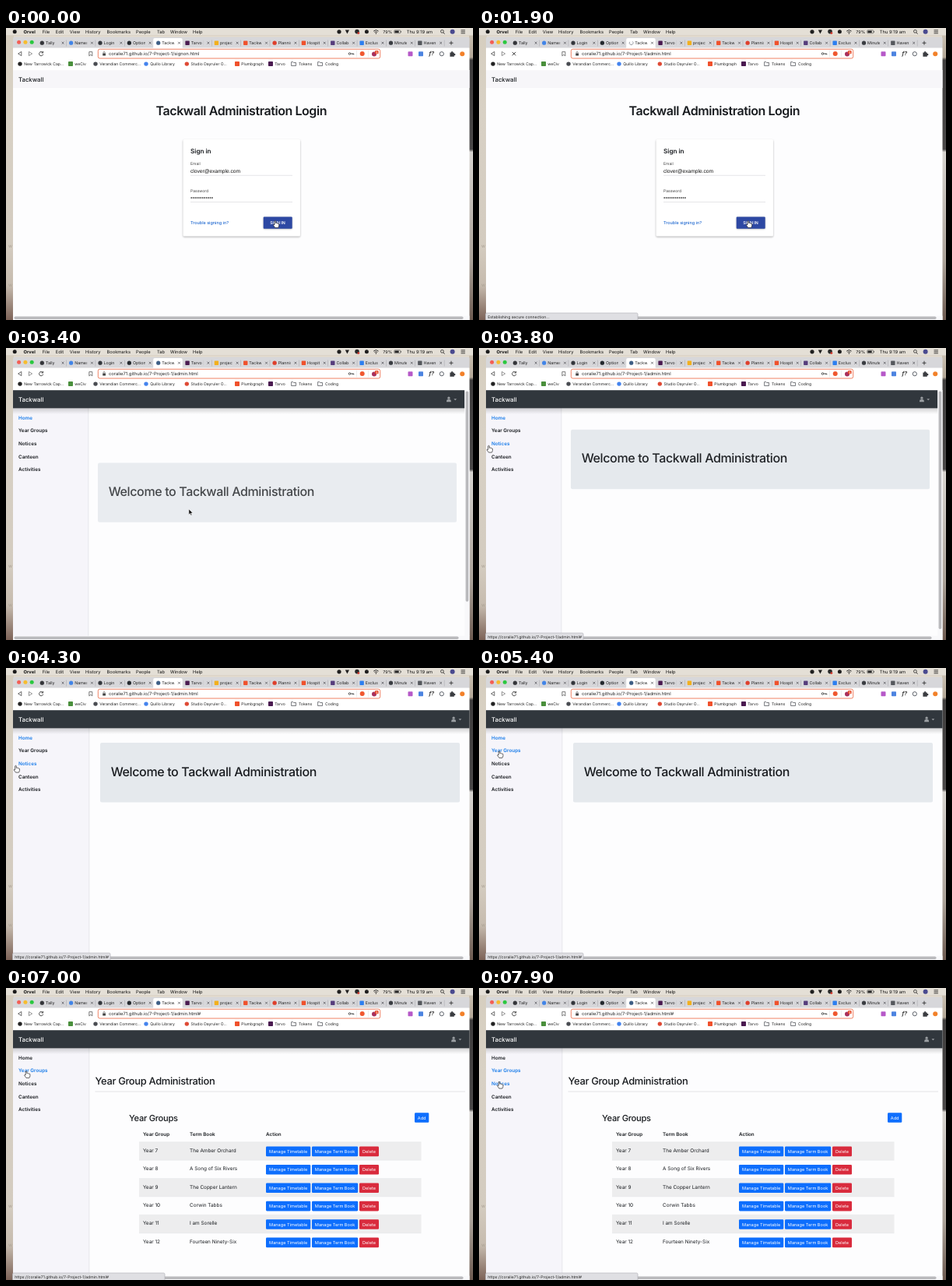
Animation, 600 px wide and 375 px high, one loop 8 s. Source, as an HTML page:

```html
<!DOCTYPE html>
<html lang="en">
<head>
<meta charset="utf-8">
<title>Administration login</title>
<style>
  html, body { margin: 0; width: 100%; height: 100%; overflow: hidden; background: #e3dacb; }
  svg { display: block; width: 100%; height: 100%; }
  text { font-family: Inter, Roboto, sans-serif; white-space: pre; text-rendering: geometricPrecision; }
</style>
</head>
<body>
<svg id="stage" viewBox="0 0 600 375">
  <defs>
    <linearGradient id="deskLeft" x2="0" y2="1">
      <stop offset="0" stop-color="#d6cebf"/><stop offset=".3" stop-color="#d8d1c5"/>
      <stop offset=".75" stop-color="#d3cbbf"/><stop offset=".88" stop-color="#c6bbae"/>
      <stop offset="1" stop-color="#7d6358"/>
    </linearGradient>
    <linearGradient id="deskRight" x2="0" y2="1">
      <stop offset="0" stop-color="#cfc6b8"/><stop offset=".1" stop-color="#b3a797"/>
      <stop offset=".11" stop-color="#3f3d3d"/><stop offset=".415" stop-color="#4a4848"/>
      <stop offset=".425" stop-color="#d6d3cf"/><stop offset=".8" stop-color="#aaa198"/>
      <stop offset="1" stop-color="#6d5a50"/>
    </linearGradient>
    <linearGradient id="drop" x2="0" y2="1">
      <stop offset="0" stop-opacity=".17"/><stop offset="1" stop-opacity="0"/>
    </linearGradient>
    <clipPath id="tabClip"><rect x="4" y="12" width="16.5" height="14"/></clipPath>
    <filter id="soft" x="-10%" y="-10%" width="120%" height="125%"><feGaussianBlur stdDeviation="1"/></filter>
  </defs>
</svg>
<script>
const LOOP = 8000;
const LOAD = 1000, ADMIN = 2650, SLIDE = 1500, GROUPS = 6200;
const INK = '#181b1f', BLUE = '#0d6efd', LINK = '#177bea', RED = '#d92b3d';
const HOST = 'coralie71.github.io/7-Project-1/';
const stage = document.getElementById('stage');

function el(tag, attrs, parent = stage) {
  const node = document.createElementNS('http://www.w3.org/2000/svg', tag);
  for (const key in attrs) node.setAttribute(key, attrs[key]);
  return parent.appendChild(node);
}
const group = (parent, attrs) => el('g', attrs, parent);
const rect = (p, x, y, width, height, fill, more) => el('rect', { x, y, width, height, fill, ...more }, p);
const dot = (p, cx, cy, r, fill, more) => el('circle', { cx, cy, r, fill, ...more }, p);
const line = (p, d, stroke, width = 0.7, more) =>
  el('path', { d, stroke, 'stroke-width': width, fill: 'none', ...more }, p);
function text(p, x, y, str, size, fill = INK, more) {
  const node = el('text', { x, y, 'font-size': size, fill, ...more }, p);
  node.textContent = str;
  return node;
}
const MEDIUM = { 'font-weight': 500 };
const BOLD = { 'font-weight': 600 };
const heading = (spacing, weight = 500) => ({ 'font-weight': weight, 'letter-spacing': spacing });
const show = (node, on) => node.setAttribute('visibility', on ? 'inherit' : 'hidden');
const put = (node, attrs) => { for (const key in attrs) node.setAttribute(key, attrs[key]); };

// Desktop
rect(stage, 0, 0, 10, 375, 'url(#deskLeft)');
rect(stage, 595, 0, 5, 375, 'url(#deskRight)');
for (const y of [282, 332]) text(stage, 3, y, 'w', 6, '#a99f92');
rect(stage, 9, 54, 586.5, 321, '#fdfdfe');

// Login page
const login = group();
rect(login, 9, 54, 586.5, 23, '#f7f6f9');
text(login, 16, 68.8, 'Tackwall', 7.75, INK, MEDIUM);
text(login, 302.3, 112.2, 'Tackwall Administration Login', 16, INK,
  { ...heading(-0.43, 600), 'text-anchor': 'middle' });
rect(login, 227.5, 143.9, 150.5, 124.5, '#000', { opacity: 0.3, rx: 1.5, filter: 'url(#soft)' });
rect(login, 227.5, 143, 150.5, 124.5, '#fff', { rx: 1.5 });
text(login, 237, 161, 'Sign in', 8.1, INK, BOLD);
text(login, 237, 176.2, 'Email', 5, '#444');
text(login, 237, 185.8, 'clover@example.com', 6.67, '#111',
  { style: 'font-family: "Liberation Sans", Arial, sans-serif' });
text(login, 237, 210.7, 'Password', 5, '#444');
for (let i = 0; i < 12; i++) dot(login, 238.2 + i * 2.43, 218, 0.85, '#111');
for (const y of [189.3, 223.5]) line(login, `M237 ${y}H368`, '#d4d4d8', 0.6);
text(login, 237, 252, 'Trouble signing in?', 5.45, '#1c66cf', MEDIUM);
rect(login, 330.8, 243.2, 36.8, 15, '#000', { opacity: 0.3, rx: 1.2, filter: 'url(#soft)' });
rect(login, 330.7, 242.6, 37, 15.2, '#2d48a3', { rx: 1 });
text(login, 349, 252.1, 'SIGN IN', 5.3, '#fff', { ...BOLD, 'text-anchor': 'middle' });

// Administration page
const admin = group();
const sidebar = rect(admin, 9, 77, 98, 298, '#f6f5fa');
const sideEdge = rect(admin, 106.6, 77, 0.6, 298, '#dcdce1');
const items = ['Home', 'Year Groups', 'Notices', 'Canteen', 'Activities'].map((name, i) =>
  text(admin, 16, 91.7 + i * 16.65, name, 6.3, INK, BOLD));

const welcome = group(admin);
const panel = rect(welcome, 0, 0, 462, 76.4, '#e5e9ed', { rx: 2 });
text(welcome, 13.7, 42.6, 'Welcome to Tackwall Administration', 16, INK, heading(-0.37));

const groups = group(admin);
text(groups, 114.5, 123.8, 'Year Group Administration', 12.9, INK, heading(-0.33));
line(groups, 'M114.5 133H590', '#d2d2d5', 0.6);
text(groups, 158, 171.2, 'Year Groups', 11.1, INK, heading(-0.25));

function button(x, y, width, label, fill) {
  rect(groups, x, y, width, 12.6, fill, { rx: 1.3 });
  text(groups, x + width / 2, y + 8.4, label, 5.6, '#fff', { 'text-anchor': 'middle' });
}
button(525, 160.2, 18.3, 'Add', BLUE);
[[176, 'Year Group'], [236, 'Term Book'], [334, 'Action']].forEach(([x, label]) =>
  text(groups, x, 189.8, label, 6.3, INK, BOLD));
['The Amber Orchard', 'A Song of Six Rivers', 'The Copper Lantern', 'Corwin Tabbs',
  'I am Sorelle', 'Fourteen Ninety-Six'].forEach((book, i) => {
  const y = 197.8 + i * 23.4;
  if (i % 2 === 0) rect(groups, 171, y, 362.5, 23.4, '#ededee');
  line(groups, `M171 ${y}H533.5`, '#dfe1e4', 0.4);
  text(groups, 176, y + 13, 'Year ' + (7 + i), 6.4);
  text(groups, 236, y + 13, book, 6.4);
  button(334, y + 5.8, 57.3, 'Manage Timetable', BLUE);
  button(393, y + 5.8, 59.2, 'Manage Term Book', BLUE);
  button(454, y + 5.8, 25, 'Delete', RED);
});

const navShade = rect(admin, 9, 77, 586.5, 8, 'url(#drop)');
const navbar = rect(admin, 9, 54, 586.5, 23.3, '#31373d');
text(admin, 16, 68.8, 'Tackwall', 7.75, '#fff', MEDIUM);
const user = group(admin);
dot(user, 0, 64.2, 1.6, '#999da1');
el('path', { d: 'M-2.9 69.2v-1.2q0-2 2-2h1.8q2 0 2 2v1.2z', fill: '#999da1' }, user);
el('path', { d: 'M6.4 65.3h3.8l-1.9 1.9z', fill: '#999da1' }, user);

// Scrollbars and status bubble
rect(stage, 9, 369.6, 586.5, 5.4, '#f8f8fa');
const hThumb = rect(stage, 10.5, 370.6, 577, 3.3, '#b9b9bc', { rx: 1.6 });
const vBar = group();
rect(vBar, 589.3, 54, 6.2, 316, '#f8f8fa');
const vThumb = rect(vBar, 590.6, 55.5, 3.6, 300, '#b9b9bc', { rx: 1.8 });
const status = group();
const bubble = rect(status, 8.5, 366, 195.5, 10, '#dfdfe3', { rx: 1.5, stroke: '#aeaeb4', 'stroke-width': 0.6 });
const statusText = text(status, 11.3, 372.8, '', 5.1, '#222');

// Tab strip
rect(stage, 9, 11.5, 586.5, 15, '#d7d7da', { rx: 2 });
rect(stage, 9, 25.5, 586.5, 28.7, '#fff');
['#f45f56', '#f7bd2e', '#2bc840'].forEach((c, i) => dot(stage, 16.6 + i * 8.3, 18.2, 2.5, c));
let spinner, tabIcon;
[['Tally', '#35363a', 1], ['Names', '#4285e8', 1], ['Login', '#33373c', 1], ['Option', '#24292e', 1],
  ['Tackwa', '#3f5f86', 1], ['Tarvo |', '#4a1a50', 0], ['project', '#f2b01e', 0], ['Tackwa', '#f0512c', 0],
  ['Plannin', '#df3f2c', 1], ['Hospita', '#f0512c', 0], ['Collabo', '#563d7c', 0], ['Exclusi', '#2d7ff0', 0],
  ['Minute', '#3a3d42', 1], ['Haven:', '#55585d', 0]].forEach(([title, color, round], i) => {
  const tab = group(stage, { transform: `translate(${46.3 + i * 37.35} 0)` });
  const active = i === 4;
  if (active) el('path', { d: 'M-6.5 26V15q0-2 2-2H29q2 0 2 2V26z', fill: '#fff' }, tab);
  else if (i !== 3) rect(tab, 31, 15.5, 0.5, 8, '#a3a3a8');
  const icon = round ? dot(tab, 0, 19.2, 2.6, color) : rect(tab, -2.7, 16.4, 5.4, 5.6, color, { rx: 0.7 });
  if (active) {
    tabIcon = icon;
    spinner = line(tab, 'M0 16.8a2.4 2.4 0 1 1-2.4 2.4', '#8d9299', 0.8);
  }
  const label = group(tab, { 'clip-path': 'url(#tabClip)' });
  text(label, 4.6, 21.1, title, 5.3, '#222');
  line(tab, 'M25.4 17.8l2.8 2.8m0-2.8l-2.8 2.8', '#44444a', 0.7);
});
line(stage, 'M569.5 19.2h5M572 16.7v5', '#333', 0.9);

// Toolbar
const ROUND = { 'stroke-linejoin': 'round' };
line(stage, 'M19.8 30.4v5.2l-4.2-2.6z', '#444', 0.8, ROUND);
line(stage, 'M29.4 30.4v5.2l4.2-2.6z', '#777', 0.8, ROUND);
const reload = line(stage, 'M47.1 31.4a2.6 2.6 0 1 0 .6 2.2M47.6 29.9v2h-2', '#333', 0.9);
const stop = line(stage, 'M42.7 30.9l4.4 4.4m0-4.4l-4.4 4.4', '#333', 0.9);
line(stage, 'M106.8 30.6h4v5.2l-2-1.5-2 1.5z', '#444', 0.7);
rect(stage, 118.3, 27.2, 362.4, 11.8, '#fff', { rx: 2.2, stroke: '#ee7453', 'stroke-width': 0.9 });
rect(stage, 124.2, 32.5, 3.8, 3, '#444', { rx: 0.5 });
line(stage, 'M125 32.6v-1a1.1 1.1 0 0 1 2.2 0v1', '#444', 0.6);
const url = text(stage, 132, 35.2, '', 5.83, '#222');
dot(stage, 441.5, 33, 1.3, 'none', { stroke: '#333', 'stroke-width': 0.8 });
line(stage, 'M442.8 33h4v1.4m-1.5-1.4v1.1', '#333', 0.8);
rect(stage, 450.5, 28.5, 0.5, 9, '#ddd');
dot(stage, 457.7, 33, 3, '#f0572f');
rect(stage, 465.5, 28.5, 0.5, 9, '#ddd');
dot(stage, 473, 33.6, 3, '#a8305c');
rect(stage, 474, 28.9, 4.6, 4.4, '#e8502e', { rx: 1 });
text(stage, 475.2, 32.6, '1', 4, '#fff', BOLD);
rect(stage, 516.5, 30.2, 6, 6, '#b659c8', { rx: 0.8 });
rect(stage, 530, 30.2, 6, 6, '#4c83e0', { rx: 0.8 });
text(stage, 543.4, 35.4, 'f?', 7, '#222', { 'font-style': 'italic', 'font-weight': 600 });
dot(stage, 559.8, 33.2, 2.6, 'none', { stroke: '#4a5058', 'stroke-width': 0.9 });
el('path', { d: 'M570.4 31.5h1.7a1.1 1.1 0 1 1 2 0h1.7v1.6a1.1 1.1 0 1 1 0 2v1.6h-5.4z', fill: '#3a3c40' });
dot(stage, 586.2, 33.2, 3, '#f2812a');

// Bookmarks
[[18, 'New Tarrowick Cap...', '#222', 1], [83, 'weCiv', '#4a8f3c', 0], [115, 'Verandian Commerc...', '#4a4d52', 1],
  [180, 'Quillo Library', '#4584ee', 1], [232.3, 'Studio Dayruler O...', '#df4a35', 1],
  [297, 'Plumbgraph', '#f0512c', 0], [340, 'Tarvo', '#4a1a50', 0],
  [369.5, 'Tokens', null], [403.5, 'Coding', null]].forEach(([x, label, color, round]) => {
  if (!color) line(stage, `M${x - 2.9} 43.6h2.2l.8.9h2.9v4h-5.9z`, '#44474c', 0.7);
  else if (round) dot(stage, x, 46.1, 2.7, color);
  else rect(stage, x - 3, 43, 6, 6, color, { rx: 0.7 });
  text(stage, x + (color ? 5.2 : 6.5), 47.9, label, 5.05, '#222');
});

// Menu bar
rect(stage, 0, 0, 600, 9.6, '#e4dfd6');
rect(stage, 0, 9.4, 600, 0.4, '#cbc4b8');
dot(stage, 11.2, 4.8, 2.5, '#1b1b1b');
[[22.5, 'Orvel'], [46.7, 'File'], [63.8, 'Edit'], [81.8, 'View'], [102, 'History'], [129.5, 'Bookmarks'],
  [167, 'People'], [194, 'Tab'], [211, 'Window'], [240, 'Help']].forEach(([x, label], i) =>
  text(stage, x, 6.9, label, 5.75, '#111', { 'font-weight': i ? 400 : 700 }));
dot(stage, 428, 4.8, 2.6, '#1f1f1f');
el('path', { d: 'M435.8 2.6h5.2l-2.6 4.9z', fill: '#1f1f1f' });
dot(stage, 451, 4.6, 2.8, '#2a2a2a');
dot(stage, 452.9, 6.6, 1.4, '#d6382d');
dot(stage, 463.4, 4.8, 2.5, '#1f1f1f');
line(stage, 'M472.2 4.1q3.2-3 6.4 0M473.6 5.6q1.8-1.6 3.6 0', '#1f1f1f', 0.9);
dot(stage, 475.4, 7, 0.7, '#1f1f1f');
text(stage, 484.3, 6.8, '79%', 5.4, '#111');
rect(stage, 498.8, 2.8, 8, 4, 'none', { rx: 0.8, stroke: '#333', 'stroke-width': 0.5 });
rect(stage, 499.5, 3.5, 5.2, 2.6, '#222');
rect(stage, 507.2, 4, 0.7, 1.6, '#333');
text(stage, 514.8, 6.9, 'Thu 9:19 am', 5.75, '#111');
dot(stage, 560.4, 4.3, 1.9, 'none', { stroke: '#222', 'stroke-width': 0.8 });
line(stage, 'M561.8 5.8l1.8 1.8', '#222', 0.9);
dot(stage, 573.6, 4.8, 3, '#4a4a8f');
line(stage, 'M584.5 2.8h5.4m-5.4 2h5.4m-5.4 2h5.4', '#222', 0.8);

// Pointer, drawn with its tip at the group's zero point
const pointer = group();
const hand = el('path', {
  d: 'M-.8 .5q.8-1 1.6 0V3q.9-.6 1.5.2.9-.5 1.4.4 1.2-.3 1.2 1V6q0 1.6-1 2.8H-.1Q-1.2 7.2-2.4 5.6q0-1.2 1.6-.4z',
  fill: '#fff', stroke: '#111', 'stroke-width': 0.65, 'stroke-linejoin': 'round'
}, pointer);
const arrow = el('path', {
  d: 'M0 0v7l1.6-1.5 1.1 2.5 1.2-.5-1.1-2.4h2.3z', fill: '#111', stroke: '#fff', 'stroke-width': 0.5
}, pointer);

// Pointer stops: time, x, y
const path = [[0, 345.8, 247.6], [3200, 345.8, 247.6], [3720, 12.5, 125.3], [4500, 12.5, 125.3],
  [5100, 26, 106.6], [7450, 26, 106.6], [7750, 26, 120.2], [LOOP, 26, 120.2]];

function pointerAt(t) {
  const i = path.findIndex(([time]) => time > t);
  const [a, b] = [path[i - 1], path[i]];
  const k = (t - a[0]) / (b[0] - a[0]);
  const s = k * k * (3 - 2 * k);
  return [a[1] + (b[1] - a[1]) * s, a[2] + (b[2] - a[2]) * s];
}

// CSS "ease": cubic-bezier(.25, .1, .25, 1)
function ease(x) {
  let lo = 0, hi = 1;
  for (let i = 0; i < 20; i++) {
    const u = (lo + hi) / 2, v = 1 - u;
    if (0.75 * v * v * u + 0.75 * v * u * u + u * u * u < x) lo = u; else hi = u;
  }
  const u = lo, v = 1 - u;
  return 0.3 * v * v * u + 3 * v * u * u + u * u * u;
}

function draw(t) {
  const onAdmin = t >= ADMIN, onGroups = t >= GROUPS;
  const loading = t >= LOAD && !onAdmin;
  const sliding = onAdmin && t < ADMIN + SLIDE;
  const [x, y] = pointerAt(t);
  const hover = onAdmin && x < 106 ? Math.round((y - 89.4) / 16.65) : -1;

  show(login, !onAdmin);
  show(admin, onAdmin);
  show(welcome, onAdmin && !onGroups);
  show(groups, onGroups);
  show(vBar, sliding);

  const right = sliding ? 589.3 : 595.5;
  put(navbar, { width: right - 9 });
  put(navShade, { width: right - 9 });
  put(sidebar, { width: sliding ? 97 : 98 });
  put(sideEdge, { x: sliding ? 105.6 : 106.6 });
  put(user, { transform: `translate(${right - 20.4} 0)` });
  put(hThumb, { width: sliding ? 571 : 577 });

  const k = sliding ? ease((t - ADMIN) / SLIDE) : 1;
  const drop = 261 * (1 - k);
  put(welcome, { transform: `translate(${sliding ? 118 : 121} ${96 + drop})`, opacity: k });
  put(panel, { width: sliding ? 461 : 462 });
  put(vThumb, { height: 314 * 317 / (317 + drop) });

  const current = onGroups ? 1 : 0;
  items.forEach((item, i) => put(item, { fill: i === current || i === hover ? LINK : INK }));

  url.textContent = HOST + (t < LOAD ? 'signon.html' : onGroups ? 'admin.html#' : 'admin.html');
  show(status, loading || hover >= 0);
  statusText.textContent = loading ? 'Establishing secure connection...' : 'https://' + HOST + 'admin.html#';
  put(bubble, { width: loading || onGroups ? 195.5 : 125.5 });

  show(reload, !loading);
  show(stop, loading);
  show(tabIcon, !loading);
  show(spinner, loading);
  put(spinner, { transform: `rotate(${-t * 0.36} 0 19.2)` });

  const moving = t > 3200 && t < ADMIN + SLIDE && hover < 0;
  show(hand, !moving);
  show(arrow, moving);
  put(pointer, { transform: `translate(${x} ${y})` });
}

const start = performance.now();
function tick() {
  draw((performance.now() - start) % LOOP);
  requestAnimationFrame(tick);
}
draw(0);
requestAnimationFrame(tick);
</script>
</body>
</html>
```
